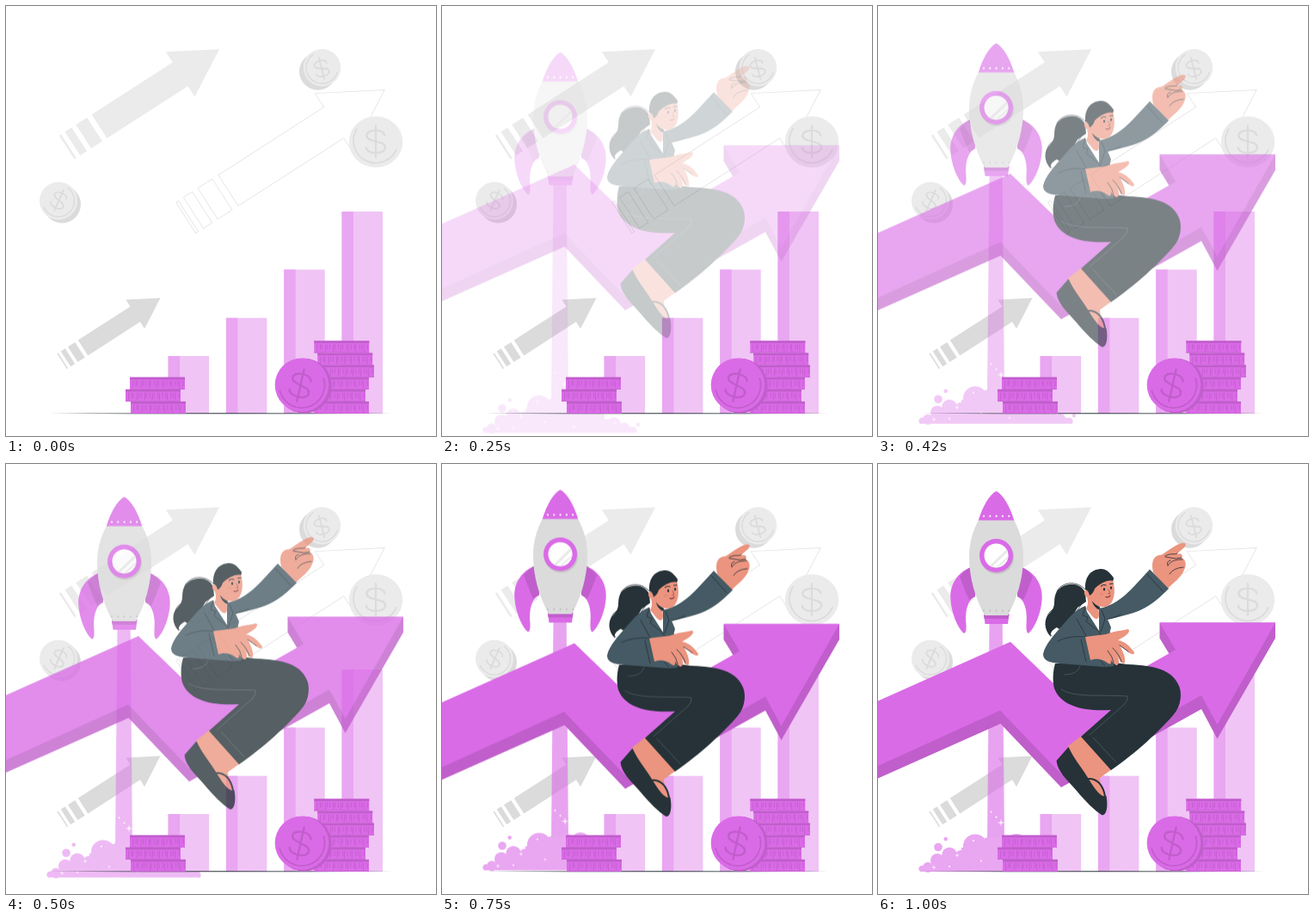
Animation, 500 px wide and 500 px high, one loop 1040 ms. Source, as an HTML page with a canvas:

```html
<!DOCTYPE html>
<html lang="en">
<head>
<meta charset="utf-8">
<title>Growth</title>
<style>
html, body { margin: 0; width: 100%; height: 100%; overflow: hidden; background: #fff; }
canvas { display: block; width: 100vw; height: 100vh; }
</style>
</head>
<body>
<canvas id="stage"></canvas>
<script>
const SIZE = 500, LOOP = 1040, STEP = 1000 / 24, TRAVEL = 30;
const PINK = '#da6be7', DEEP = '#c05ecb', SOFT = '#e9a6f1', PALE = '#f0c4f5';
const DARK = '#263238', SLATE = '#455a64', SKIN = '#eb947f', GRAY = '#dbdbdb', MIST = '#ebebeb';
const dpr = window.devicePixelRatio || 1;
const stage = document.getElementById('stage');
stage.width = stage.height = SIZE * dpr;
const out = stage.getContext('2d');
let g;

function layer(paint) {
  const c = document.createElement('canvas');
  c.width = c.height = SIZE * dpr;
  g = c.getContext('2d');
  g.scale(dpr, dpr);
  g.lineCap = g.lineJoin = 'round';
  paint();
  return c;
}
function fill(d, color) {
  g.fillStyle = color;
  g.fill(new Path2D(d));
}
function line(d, color, w = 1) {
  g.strokeStyle = color;
  g.lineWidth = w;
  g.stroke(new Path2D(d));
}
function disc(x, y, r, color, ry = r) {
  g.fillStyle = color;
  g.beginPath();
  g.ellipse(x, y, r, ry, 0, 0, 7);
  g.fill();
}
function rect(x, y, w, h, color) {
  g.fillStyle = color;
  g.fillRect(x, y, w, h);
}
function at(x, y, turn, scale, paint) {
  g.save();
  g.translate(x, y);
  g.rotate(turn);
  g.scale(scale, scale);
  paint();
  g.restore();
}
function star(x, y, r) {
  const q = r * 0.15;
  fill(`M${x},${y - r}L${x + q},${y - q}L${x + r},${y}L${x + q},${y + q}L${x},${y + r}L${x - q},${y + q}L${x - r},${y}L${x - q},${y - q}Z`, '#fff');
}

function stripedArrow(x, y, scale, color, hollow) {
  const d = 'M0,-16.4H112V-31L166,0L112,31V16.4H0Z' +
    'M-6.5,-16.4H-21.8V16.4H-6.5ZM-27.7,-16.4H-37V16.4H-27.7ZM-42.4,-16.4H-45V16.4H-42.4Z';
  at(x, y, -0.572, scale, () => hollow ? line(d, color, 0.9 / scale) : fill(d, color));
}
function dollar(x, y, h, turn, color, w) {
  at(x, y, turn, h, () => {
    line('M0,-1V1M.56,-.38C.5,-.82 -.58,-.8 -.58,-.36C-.58,.1 .6,-.1 .6,.38C.6,.84 -.55,.84 -.6,.4', color, w / h);
  });
}
function rim(x, y, r, from, to, color, w) {
  g.strokeStyle = color;
  g.lineWidth = w;
  g.beginPath();
  g.arc(x, y, r, from, to);
  g.stroke();
}

function backdrop() {
  stripedArrow(108.5, 140, 1, MIST);
  stripedArrow(258.5, 214.5, 1.302, '#e6e6e6', true);
  stripedArrow(89.5, 397.5, 0.645, GRAY);

  disc(362.7, 76, 21.7, GRAY);
  disc(367.5, 71.7, 21.7, MIST);
  rim(367.5, 71.7, 18.5, 0.3, 4.1, GRAY, 1.4);
  dollar(367, 72.5, 13, -0.25, GRAY, 1.8);

  disc(430, 158, 31.2, MIST, 29.8);
  rim(430, 156.5, 26, 0.4, 3.7, GRAY, 1.6);
  dollar(430, 157.5, 18.5, 0, GRAY, 2.2);

  disc(65.2, 230.6, 21.8, GRAY);
  disc(61, 226.5, 22, MIST);
  rim(61, 226.5, 18.5, -0.9, 2.7, GRAY, 1.4);
  dollar(61.5, 226, 13, 0.42, GRAY, 1.8);
}

function fin() {
  fill('M108,120C92,126 83.5,141 84.3,156C85,172 92,190 100,197Q103,197 102.5,186C101,172 104,158 113,154Z', PINK);
  fill('M108,120Q101,123 95,131C99,141 102,150 106,158L113,154V121Z', DEEP);
}
function rocket() {
  g.globalAlpha = 0.62;
  fill('M129.5,184H144.7L147,440H127Z', PINK);
  g.globalAlpha = 1;

  fill('M50,467H224Q228,470 226,474H49Q45,470 50,467Z', SOFT);
  [[58, 469, 6], [69, 461, 8], [83, 454.5, 8.7], [97, 457, 8], [113, 444.5, 14], [130, 448, 14],
   [145, 444, 12], [161, 441, 11], [176, 455, 13], [200, 464, 8], [212, 468, 6]]
    .forEach(([x, y, r]) => disc(x, y, r, SOFT));
  rect(64, 458, 140, 15, SOFT);
  rect(97, 446, 80, 20, SOFT);
  disc(70, 445.5, 4.8, SOFT);
  disc(78.7, 436, 2.3, SOFT);
  disc(228, 464.5, 2.2, SOFT);
  star(143, 417, 4.5);
  star(92, 455, 3);
  star(65, 469, 3);
  [[131.5, 404.5], [137.5, 410.5], [111, 438], [120, 461.5], [153, 467], [83, 468], [201, 462]]
    .forEach(([x, y]) => disc(x, y, 0.9, '#fff'));

  fin();
  g.save();
  g.translate(275, 0);
  g.scale(-1, 1);
  fin();
  g.restore();

  fill('M123,174H152.5L151,186H124.5Z', PINK);
  fill('M123,175H152.5L151.6,180H123.6Z', DEEP);
  fill('M117,65H158C165,78 169,92 169,108C169,132 162,156 151,176H124C113,156 106,132 106,108C106,92 110,78 117,65Z', GRAY);
  fill('M137.5,31.5C146,36 153,49 158.3,65.5H116.7C122,49 129,36 137.5,31.5Z', PINK);
  for (let i = 0; i < 5; i++) {
    disc(123 + i * 7.3, 60.7, 1.1, '#fff');
    disc(123 + i * 7.3, 170.5, 0.9, '#b8b8b8');
  }
  disc(138.5, 108.5, 19.5, '#c4c4c4');
  disc(137.5, 106.5, 19.5, PINK);
  disc(137.5, 106.5, 14, '#fff');
  g.save();
  g.beginPath();
  g.arc(137.5, 106.5, 14, 0, 7);
  g.clip();
  line('M128,122L154,97', '#e9e9e9', 3);
  line('M134,124L156,104', '#e9e9e9', 1.5);
  g.restore();
}

function bars() {
  [407, 362.7, 306.5, 239].forEach((top, i) => {
    const x = 188.6 + i * 67.3;
    rect(x, top, 47.5, 474 - top, PALE);
    rect(x, top, 13.5, 474 - top, SOFT);
  });
}

function bigArrow() {
  fill('M0,290V365.5L142.5,302L213,376L376,285L394.5,319.5L462,202.5V184.5H327.5V202.5L339,221.5L376,250L213,350L142,280Z', DEEP);
  fill('M0,275.5L154,206.8L231,281L346,216L327.5,184.5H462L394.5,303L376,269L213,360.5L142,286.5L0,351Z', PINK);
}

function legs() {
  fill('M221,328L238,315L272,355L258,365C258,374 264,380 264,388L255,391L240,376Z', SKIN);
  fill('M221.5,329L207.5,345C209,358 219,366 231,380C241,392 252,403 260,408C265,410 268,400 265.5,386C260,388 254,381 246,368C238,354 229,345 221.5,329Z', DARK);
  line('M245,366C254,366 261,371 264,386', DARK, 2);
  fill('M206,232C203,242 203,253 205,261C213,282 240,288 271,286L236,317L271,356C300,336 328,310 344,291C353,281 354,264 349,256C342,241 325,234 290,233L268,230Z', DARK);
  line('M213,262C228,272 260,268 290,270Q291,275 286,280L246,315', '#55646b', 0.7);
  line('M250,318L277,347M235,235Q232,245 217,245', '#55646b', 0.7);
}

function farHand() {
  fill('M320,126C317,112 321,106 330,105.5C337,101 346,94 353,92C359,91 359,95 355,98L347,105C353,103 355,106 353,109C358,111 359,118 356,123C353,132 343,138 336,146Z', SKIN);
  line('M334,107C340,103 345,106 348,104M334,108L346,110L353,109M337,118C341,112 347,111 354,111M337,118Q335,113 340,112M339,128Q343,121 355,120', DARK, 0.8);
}
function nearHand() {
  fill('M241,201L265,198C275,194 284,194 290,192C295,193 290,199 284,202L279,205C287,206 293,212 298,219C298,223 293,221 289,217L281,211C285,218 288,225 287,231C284,234 281,228 277,221C281,227 281,234 277,234C273,232 270,227 268,222C272,228 272,234 268,232C262,228 257,225 247,228Z', SKIN);
  line('M281,211Q287,215 291,218M273,214Q281,222 283,230M267,217Q273,224 274,231', DARK, 0.8);
}

function hairBack() {
  fill('M241,150C236,136 214,137 207,150C203,159 208,165 200,173C192,180 193,193 201,201C200,195 203,193 208,190C214,197 224,182 232,167L242,160Z', DARK);
  line('M208,148C213,138 230,134 241,146M204,169C195,172 192,190 202,200M239,160C231,171 226,178 222,189', DARK, 0.8);
}

function torso() {
  fill('M257,168C272,165 284,157 298,142L316,122.5L338,145C328,155 318,164 306,169.5C294,175 279,178 262,182Z', SLATE);
  line('M313,128L331,148M264,181Q275,179 282,175', DARK, 0.8);
  fill('M243,163L258,172L259,196L250,193L240,170Z', '#fff');
  fill('M241,165C230,169 222,179 215,187C206,197 194,210 192,221C192,229 200,231 212,232L264,236L274,235C273,222 272,208 271,198L258,178L257,194L243,172Z', SLATE);
  fill('M257,167L262,169L271,190L268,202Q259,198 257,193Z', SLATE);
  line('M241,166L238,176L244,178L242,183L257,195L262,204M260,170L264,180L259,195M231,180L243,202M209,206Q222,199 241,201M259,229L264,235', DARK, 0.8);
  line('M236,204L242,230', DARK, 0.8);
}

function head() {
  fill('M246,136C255,128 269,128 273,134C275,142 276,151 273,158C270,166 263,168 256,165L257,174Q257,184 250,178L242,168C245,163 244,159 243,155C238,152 239,144 246,147Z', SKIN);
  fill('M249,159Q252,164 258,166L257,169.5Q250,166 249,159Z', DARK);
  fill('M241,146C240,133 246,123.5 257,122.3C265,121 269,126 273,131Q275,133 273,136C267,134 258,139 252,145Q250,151 246,153Q245,147 241,146Z', DARK);
  line('M259.5,142Q262,139.5 265,141M269.5,139.5L273,139', DARK, 1.1);
  disc(263, 145.8, 1.2, DARK, 1.7);
  disc(271, 144, 1.2, DARK, 1.7);
  line('M268,146L270,150.5L267.5,151', '#a84f43', 0.8);
  line('M265,154.5Q268,156 270,153', '#7a2a30', 1.1);
  disc(260, 151, 2.4, '#e88a78', 1.5);
}

function rider() {
  bigArrow();
  hairBack();
  legs();
  farHand();
  torso();
  head();
  nearHand();
}

function stackCoin(x, y) {
  rect(x, y, 64, 14, PINK);
  rect(x, y, 64, 2.6, DEEP);
  rect(x, y + 13.3, 64, 0.7, DEEP);
  for (let i = 0; i < 20; i++) {
    const dx = 3 + i * 3.05 + Math.sin(i * 2.4) * 0.8;
    rect(x + dx, y + 4, 0.8, i % 3 ? 6 : 8.5, DEEP);
  }
}
function front() {
  fill('M50,473.8Q250,472.8 450,473.8Q250,474.8 50,473.8Z', DARK);
  [144, 139, 145].forEach((x, i) => stackCoin(x, 431.7 + i * 14.1));
  [358.3, 362.2, 364, 358, 354, 358].forEach((x, i) => stackCoin(x, 389.4 + i * 14.1));
  disc(346.6, 441.7, 32, DEEP);
  disc(344, 440.7, 31.3, PINK);
  rim(344, 440.7, 26.5, -0.3, 2.9, DEEP, 1.7);
  dollar(342.5, 441, 19, 0.22, DEEP, 2.4);
}

const back = layer(backdrop), ship = layer(rocket), chart = layer(bars);
const hero = layer(rider), fore = layer(front);

// Bezier easing with a small overshoot near the end.
function ease(x) {
  if (x >= 1) return 1;
  const curve = (a, b, t) => 3 * (1 - t) * (1 - t) * t * a + 3 * (1 - t) * t * t * b + t * t * t;
  let lo = 0, hi = 1;
  for (let i = 0; i < 24; i++) {
    const mid = (lo + hi) / 2;
    if (curve(0.36, 0.5, mid) < x) lo = mid; else hi = mid;
  }
  return curve(-0.01, 1.38, lo);
}

function put(c, dy = 0, alpha = 1) {
  out.globalAlpha = Math.max(0, Math.min(1, alpha));
  out.drawImage(c, 0, dy * dpr);
}
function draw() {
  const tick = Math.floor((performance.now() % LOOP + 5) / STEP);
  const p = tick < 3 ? 0 : ease((tick + 0.4) / 24);
  const gap = (1 - p) * TRAVEL;
  out.globalAlpha = 1;
  out.fillStyle = '#fff';
  out.fillRect(0, 0, stage.width, stage.height);
  put(back);
  put(ship, gap, p);
  put(chart);
  put(hero, -gap, p);
  put(fore);
  requestAnimationFrame(draw);
}
draw();
</script>
</body>
</html>
```
